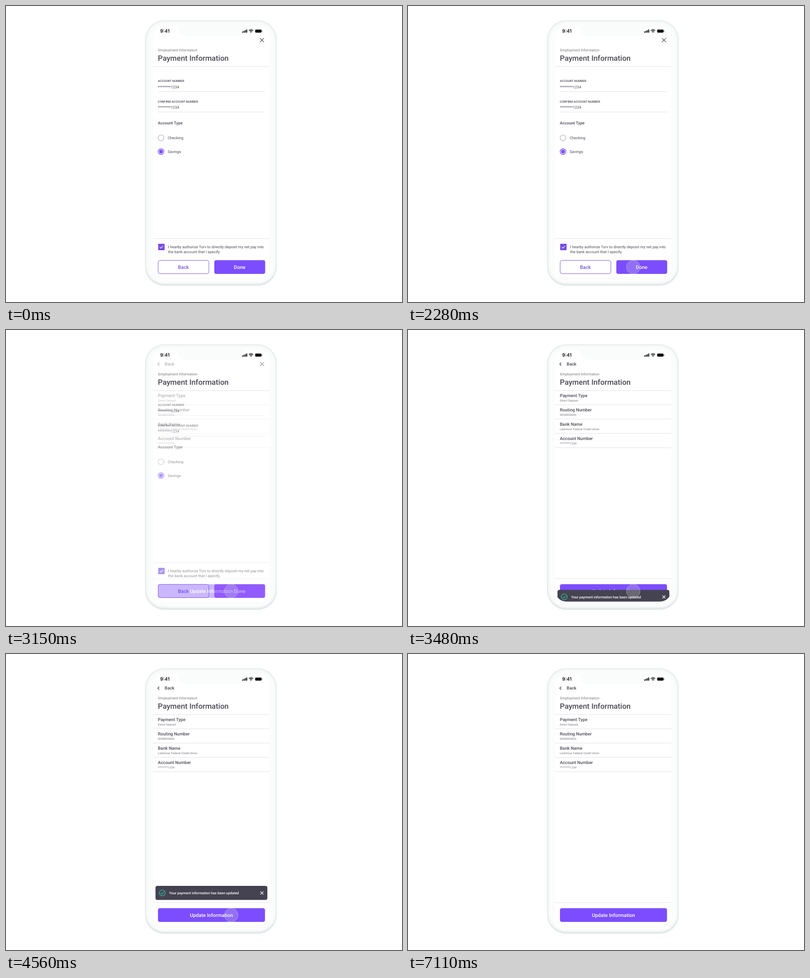
Recreate the animation shown at these times as an HTML page. Size 800 px wide and 600 px high, loop 7.17 s.

```html
<!DOCTYPE html>
<html lang="en">
<head>
<meta charset="utf-8">
<title>Payment information</title>
<style>
html, body { margin: 0; width: 100%; height: 100%; overflow: hidden; background: #fff; }
.phone {
  position: absolute; left: 281px; top: 29px; width: 266px; height: 538px;
  border-radius: 39px; background: #fbfcfc;
  box-shadow: inset 0 0 2px 1px #dfe5e7, inset 0 0 7px 1px #e9eeef, inset 0 -4px 5px -2px #c9d2d5;
}
svg { position: absolute; left: 0; top: 0; }
text { font-family: Roboto, sans-serif; fill: #4a4955; text-rendering: geometricPrecision; }
.m { font-weight: 500; }
.line { stroke: #e2e4ea; fill: none; }
.icon { fill: none; stroke: #4a4955; stroke-width: 1.3; }
.purple { fill: #7c4dff; }
.white { fill: #fff; }
.mid { text-anchor: middle; }
</style>
</head>
<body>
<div class="phone"></div>
<svg width="800" height="600" viewBox="0 0 800 600">
  <defs>
    <clipPath id="screen"><rect x="297" y="41" width="235" height="509.5" rx="23"/></clipPath>
  </defs>
  <g clip-path="url(#screen)">
    <rect x="297" y="41" width="235" height="510" class="white"/>
    <g id="form"></g>
    <g id="list"></g>
    <g id="toast">
      <rect x="302" y="0" width="226" height="28.5" rx="4" fill="#454351"/>
      <circle cx="315.7" cy="14.2" r="5.9" fill="none" stroke="#35c7a4" stroke-width="1.1"/>
      <path d="M312.7 14.4l2.2 2.2 4-4.4" fill="none" stroke="#35c7a4" stroke-width="1.1"/>
      <text x="329.7" y="17.2" font-size="7.1" class="m white">Your payment information has been updated</text>
      <path d="M514 11.4l6 6m0-6l-6 6" class="icon" style="stroke:#fff"/>
    </g>
  </g>
  <path d="M346 41h138q-3 1-3 5q0 14-13 14H361q-13 0-13-14q0-4-2-5z" fill="#fafbfb"/>
  <text x="311.6" y="54.3" font-size="9.4" style="font-family:Inter,sans-serif;font-weight:600;fill:#111">9:41</text>
  <g fill="#111">
    <path d="M477 51.8h1.9v2.2H477zM479.8 50.6h1.9V54h-1.9zM482.6 49h1.9v5h-1.9zM485.4 47.4h1.9V54h-1.9z"/>
    <rect x="503.3" y="47.8" width="13" height="6.2" rx="1.8"/>
    <rect x="516.8" y="49.9" width="0.9" height="2" rx="0.4"/>
    <path d="M495 54.2l-1.6-1.8q1.6-1.2 3.2 0z"/>
  </g>
  <path d="M490.6 49.6q4.4-3.6 8.8 0M492.2 51.3q2.8-2.2 5.6 0" fill="none" stroke="#111" stroke-width="1.3"/>
  <circle id="cursor" fill="#d8d8d8" fill-opacity=".25" stroke="#c4c4c4" stroke-opacity=".6" stroke-width=".9"/>
</svg>
<script>
const $ = id => document.getElementById(id);
const text = (x, y, size, str, cls = '', fill = '') =>
  `<text x="${x}" y="${y}" font-size="${size}" class="${cls}"${fill && ` style="fill:${fill}"`}>${str}</text>`;
const rule = (y, x1 = 297, x2 = 532) => `<path d="M${x1} ${y}H${x2}" class="line"/>`;
const header = text(307.5, 92, 7.2, 'Employment Information', '', '#77767f') +
  text(306.8, 111.2, 15.15, 'Payment Information', 'm') + rule(122.7);

const field = (y, label) => text(306.8, y, 6, label, 'm') +
  text(306.8, y + 12.6, 7.55, '********1234') + rule(y + 19.3, 307, 523);

$('form').innerHTML = header +
  '<path d="M513 65.2l8 8m0-8l-8 8" class="icon" style="stroke-width:1.2"/>' +
  field(154, 'ACCOUNT NUMBER') + field(195.6, 'CONFIRM ACCOUNT NUMBER') +
  text(306.8, 239.8, 8.2, 'Account Type', 'm') +
  '<circle cx="313.2" cy="267.3" r="5.8" fill="none" stroke="#b4b3c2" stroke-width="1.2"/>' +
  '<circle cx="313.2" cy="295.1" r="5.8" fill="none" stroke="#7448e8" stroke-width="1.2"/>' +
  '<circle cx="313.2" cy="295.1" r="3.9" class="purple"/>' +
  text(326.8, 270, 7.65, 'Checking') + text(326.8, 297.7, 7.65, 'Savings') + rule(471.5) +
  '<rect x="307.4" y="482" width="13" height="13" rx="1.2" fill="#744be6"/>' +
  '<path d="M310.6 488.6l2.3 2.3 4.4-4.6" fill="none" stroke="#fff" stroke-width="1.2"/>' +
  text(327.6, 491.3, 7.65, 'I hearby authorize Torv to directly deposit my net pay into') +
  text(327.6, 501.2, 7.65, 'the bank account that I specify.') +
  '<rect x="307.4" y="515.6" width="102.4" height="27" rx="4" fill="#fff" stroke="#8766d6"/>' +
  text(358.3, 532.6, 10.05, 'Back', 'm mid', '#7a55df') +
  '<rect id="done" x="420.8" y="515.2" width="102.8" height="27.8" rx="4"/>' +
  text(472, 532.6, 10.15, 'Done', 'm mid white');

const rows = [
  ['Payment Type', 'Direct Deposit'],
  ['Routing Number', '0000000000'],
  ['Bank Name', 'Larkmoor Federal Credit Union'],
  ['Account Number', '********1234'],
];
$('list').innerHTML = '<rect x="297" y="60" width="235" height="491" class="white"/>' + header +
  '<path d="M309.6 66.2l-3 3 3 3" class="icon"/>' + text(320.6, 72.2, 8.85, 'Back', 'm') +
  rows.map(([name, value], i) => text(306.8, 136 + 29 * i, 8.82, name, 'm') +
    text(306.8, 145.2 + 29 * i, 5.9, value, '', '#77767f') + rule(151.6 + 29 * i)).join('') +
  rule(503.8) + '<rect x="307" y="515.2" width="216.2" height="27.8" rx="4" class="purple"/>' +
  text(415, 532.6, 10.05, 'Update Information', 'm mid white');

const LOOP = 7170;
const span = (t, a, b) => Math.min(1, Math.max(0, (t - a) / (b - a)));
const mix = (a, b, k) => a + (b - a) * k;
const inOut = k => k * k * (3 - 2 * k);
const out = k => 1 - (1 - k) ** 2;

function draw(t) {
  const move = inOut(span(t, 1500, 2160));
  const cursor = $('cursor');
  cursor.setAttribute('cx', mix(486, 455, move));
  cursor.setAttribute('cy', mix(274.5, 529.2, move));
  cursor.setAttribute('r', mix(14.3, 13.8, move));
  cursor.style.opacity = span(t, 900, 1200) * (1 - span(t, 5820, 6120));

  const hover = span(t, 2400, 2650);
  $('done').style.fill = `rgb(${mix(124, 159, hover)},${mix(77, 102, hover)},255)`;
  $('list').style.opacity = span(t, 3030, 3330);

  // The toast pops in partly raised, then eases to rest and fades away.
  $('toast').setAttribute('transform', `translate(0 ${mix(527, 470, out(span(t, 3480, 3960)))})`);
  $('toast').style.opacity = t < 3480 ? 0 : 1 - span(t, 5010, 5370);
}

const start = performance.now();
function tick() {
  draw((performance.now() - start) % LOOP);
  requestAnimationFrame(tick);
}
tick();
</script>
</body>
</html>
```
